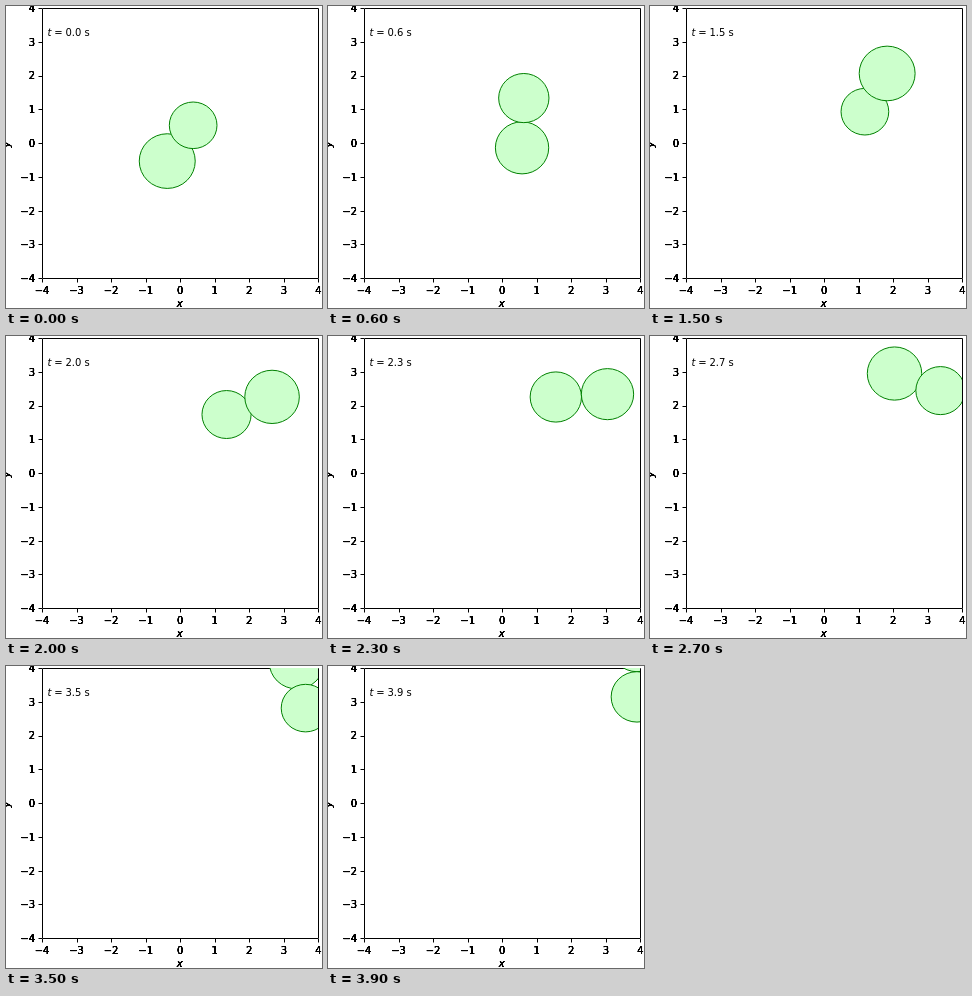
Write an HTML page that moves like this. It is 316 by 302 pixels and loops after 4 s.

```html
<!DOCTYPE html>
<html lang="en">
<head>
<meta charset="utf-8">
<title>Two orbiting circles</title>
<style>
  html, body { margin: 0; width: 100%; height: 100%; overflow: hidden; background: #fff; }
  svg { display: block; width: 316px; height: 302px; }
  text { font: 10px "DejaVu Sans", sans-serif; fill: #000; }
  .var { font-style: italic; }
  .mid { text-anchor: middle; }
  .end { text-anchor: end; }
  .ball { fill: #ccffcc; stroke: #008000; stroke-width: 1; }
  .axis { fill: none; stroke: #000; stroke-width: 1; }
</style>
</head>
<body>
<svg viewBox="0 0 316 302" xmlns="http://www.w3.org/2000/svg">
  <defs>
    <clipPath id="plot"><rect x="36" y="2" width="276" height="271"/></clipPath>
    <!-- thickens the antialiased edges of the axis labels -->
    <filter id="heavy" filterUnits="userSpaceOnUse" x="0" y="0" width="316" height="302">
      <feComponentTransfer><feFuncA type="linear" slope="3"/></feComponentTransfer>
    </filter>
  </defs>
  <path id="frame" class="axis"/>
  <g id="labels" filter="url(#heavy)">
    <text class="var mid" x="173.7" y="301">x</text>
    <text class="var mid" transform="translate(4 138.5) rotate(-90)">y</text>
  </g>
  <g clip-path="url(#plot)">
    <ellipse id="a" class="ball"/>
    <ellipse id="b" class="ball"/>
  </g>
  <text class="var" x="41.5" y="30">t</text>
  <text x="48.2" y="30">=</text>
  <text id="clock" x="59.4" y="30"></text>
</svg>
<script>
  const SX = 34.55, SY = 33.75, LOOP = 4000, STEP = 100;
  const px = x => 174.2 + SX * x;
  const py = y => 137.2 - SY * y;
  const snap = v => Math.floor(v + 0.5) + 0.5;
  const el = id => document.getElementById(id);

  function label(cls, x, y, str) {
    const node = document.createElementNS("http://www.w3.org/2000/svg", "text");
    node.setAttribute("class", cls);
    node.setAttribute("x", x);
    node.setAttribute("y", y);
    node.textContent = str;
    el("labels").appendChild(node);
  }

  function drawAxes() {
    let d = "M36.5 2.5H312.5V272.5H36.5Z";
    for (let n = -4; n <= 4; n++) {
      const str = n < 0 ? "\u2212" + -n : String(n);
      const x = snap(px(n)), y = snap(py(n));
      d += `M${x} 273v3.5M36 ${y}h-3.5`;
      label("mid", px(n), 288, str);
      label("end", 29.2, Math.round(py(n) + 3.8), str);
    }
    el("frame").setAttribute("d", d);
  }

  function place(ball, x, y, r) {
    ball.setAttribute("cx", px(x));
    ball.setAttribute("cy", py(y));
    ball.setAttribute("rx", SX * r);
    ball.setAttribute("ry", SY * r);
  }

  // The pair circles a centre at (t, t) on a spherical figure-eight;
  // depth changes the radii.
  function render(ms) {
    const t = Math.floor((ms % LOOP) / STEP) * STEP / 1000;
    const u = t - Math.PI / 4;
    const dx = 0.75 * Math.sin(u) ** 2;
    const dy = 0.75 * Math.cos(u);
    const dr = 0.06 * Math.cos(2 * t);
    place(el("a"), t - dx, t - dy, 0.75 + dr);
    place(el("b"), t + dx, t + dy, 0.75 - dr);
    el("clock").textContent = t.toFixed(1) + " s";
  }

  drawAxes();
  render(0);
  let start = null;
  function tick(now) {
    if (start === null) start = now;
    render(Math.max(0, now - start));
    requestAnimationFrame(tick);
  }
  requestAnimationFrame(tick);
</script>
</body>
</html>
```
